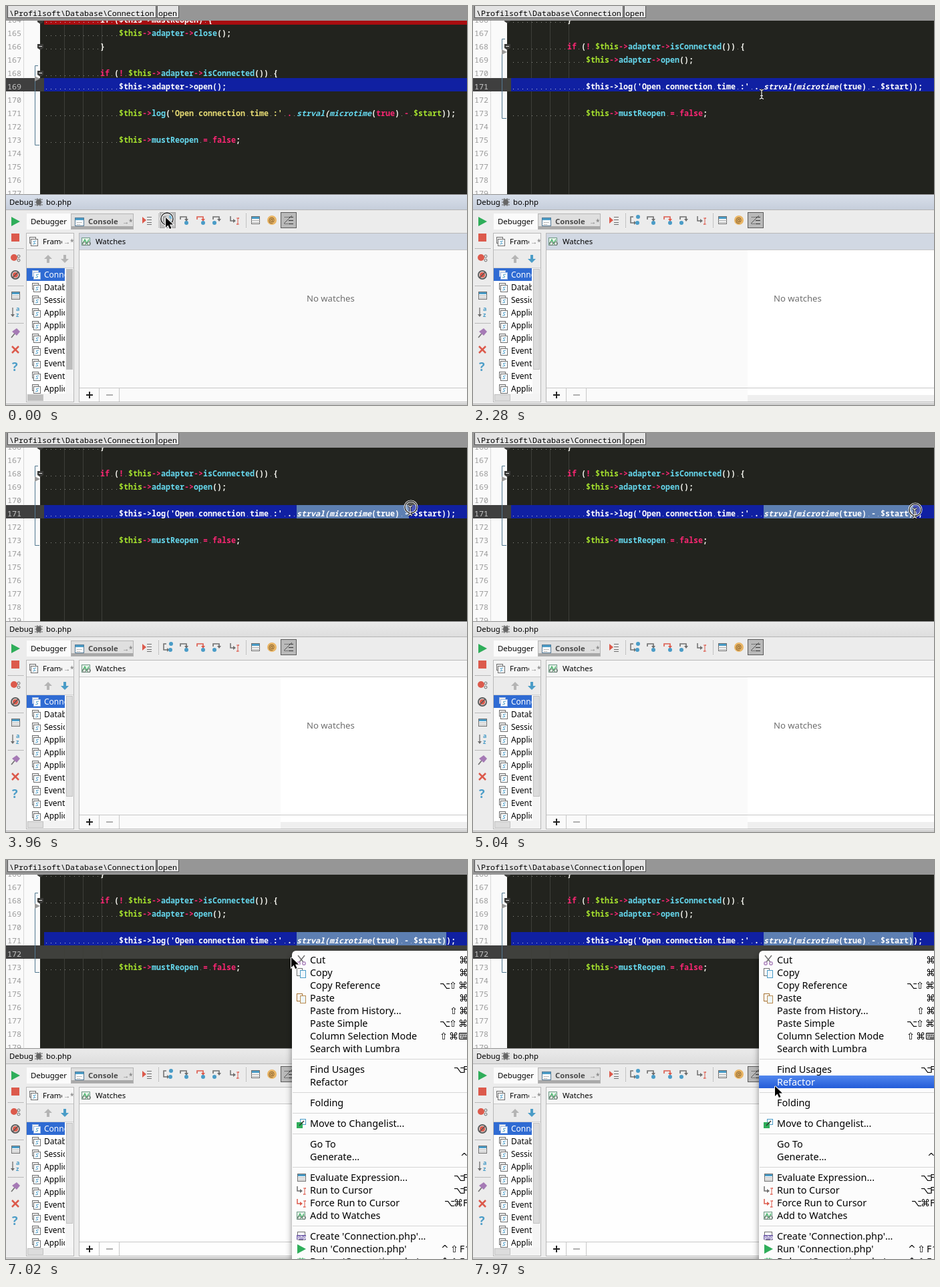
Recreate the animation shown at these times as an HTML page with a canvas. Size 690 by 598 pixels, loop 8 s.

```html
<!DOCTYPE html>
<html lang="en">
<head>
<meta charset="utf-8">
<title>Debugger session</title>
<style>
html, body { margin: 0; width: 100%; height: 100%; overflow: hidden; background: #ececec; }
canvas { display: block; }
</style>
</head>
<body>
<canvas id="stage" width="690" height="598"></canvas>
<script>
const ctx = document.getElementById('stage').getContext('2d');
const UI = '"Noto Sans", "Open Sans", sans-serif';
const MONO = '11.67px "Noto Sans Mono", "DejaVu Sans Mono", monospace';
const GREY = '#6e6e6e', BLUE = '#4a9cc7', RED = '#dc5a4c', GREEN = '#2fae5a';

// Drawing helpers
function rect(x, y, w, h, color) {
  ctx.fillStyle = color;
  ctx.fillRect(x, y, w, h);
}
function box(x, y, w, h, fill, edge) {
  rect(x, y, w, h, edge);
  rect(x + 1, y + 1, w - 2, h - 2, fill);
}
function text(s, x, y, font, color = '#000') {
  ctx.font = font;
  ctx.fillStyle = color;
  ctx.fillText(s, x, y);
}
const ui = (s, x, y, size = 11.4, color = '#000', weight = '') =>
  text(s, x, y, `${weight} ${size}px ${UI}`, color);
function path(points, color, width) {
  ctx.beginPath();
  for (let i = 0; i < points.length; i += 2) ctx.lineTo(points[i], points[i + 1]);
  if (width) {
    ctx.strokeStyle = color;
    ctx.lineWidth = width;
    ctx.stroke();
  } else {
    ctx.fillStyle = color;
    ctx.fill();
  }
}
function disc(x, y, r, color, width) {
  ctx.beginPath();
  ctx.arc(x, y, r, 0, 7);
  if (width) {
    ctx.strokeStyle = color;
    ctx.lineWidth = width;
    ctx.stroke();
  } else {
    ctx.fillStyle = color;
    ctx.fill();
  }
}
function fade(x, y, w, h, top, bottom) {
  const g = ctx.createLinearGradient(0, y, 0, y + h);
  g.addColorStop(0, top);
  g.addColorStop(1, bottom);
  rect(x, y, w, h, g);
}
function dots(x, y, count, dx, dy, color) {
  for (let i = 0; i < count; i++) rect(x + i * dx, y + i * dy, 1, 1, color);
}
function clipped(x, y, w, h, paint) {
  ctx.save();
  ctx.beginPath();
  ctx.rect(x, y, w, h);
  ctx.clip();
  paint();
  ctx.restore();
}
function at(x, y, paint) {
  ctx.save();
  ctx.translate(x, y);
  paint();
  ctx.restore();
}

// Eased position between [time, x, y] keys
function track(keys, t) {
  let a = keys[0];
  for (const b of keys) {
    if (t < b[0]) {
      const k = Math.max(0, (t - a[0]) / (b[0] - a[0] || 1)), e = k * k * (3 - 2 * k);
      return [a[1] + (b[1] - a[1]) * e, a[2] + (b[2] - a[2]) * e];
    }
    a = b;
  }
  return [a[1], a[2]];
}
const toEditor = [[1260, 239, 317], [1500, 350, 290], [1740, 500, 225], [2040, 433, 139]];
const beam = [
  [2100, 433, 139], [2280, 432, 132], [2520, 432, 128], [3060, 432, 128], [3240, 501, 113],
  [3540, 501, 113], [3660, 560, 104], [3900, 560, 104], [3960, 605, 116], [4380, 653, 119],
  [4860, 653, 119], [5040, 661, 120], [5460, 661, 120], [5820, 455, 130], [6060, 455, 130],
  [6360, 427, 139]];
const inMenu = [
  [7020, 427, 146], [7260, 450, 276], [7560, 450, 276], [7790, 451, 328], [7960, 451, 328],
  [7970, 452, 339]];

// Editor
const code = {
  164: [12, 'if ($this->mustReopen) {'],
  165: [16, '$this->adapter->close();'],
  166: [12, '}'],
  168: [12, 'if (! $this->adapter->isConnected()) {'],
  169: [16, '$this->adapter->open();'],
  171: [16, "$this->log('Open connection time :' . strval(microtime(true) - $start));"],
  173: [16, '$this->mustReopen = false;']
};
function tint(token) {
  if (token[0] === "'") return '#e6db74';
  if (token[0] === '$') return '#a6e22e';
  if (/^(->|[-=!.]|if|true|false)$/.test(token)) return '#f92672';
  return /^\w/.test(token) ? '#66d9ef' : '#f8f8f2';
}
function codeLine(row, y, plain) {
  if (!code[row]) return;
  const [indent, src] = code[row], line = ' '.repeat(indent) + src;
  for (const m of line.matchAll(/'[^']*'|\$\w+|->|\w+|\S/g)) {
    const slant = /^(strval|microtime)$/.test(m[0]) || (m[0] === '(' && line.startsWith('strval', m.index - 6));
    text(m[0], 57 + 7 * m.index, y + 17, (slant ? 'italic ' : '') + '600 ' + MONO, plain ? '#fff' : tint(m[0]));
  }
  [...line].forEach((c, i) => {
    if (c === ' ') rect(60 + 7 * i, y + 16, 1, 1, plain ? '#b9c0e0' : '#8a8b84');
  });
}
function foldMark(y) {
  path([47, y - 4, 56, y - 4, 56, y + 2, 51.5, y + 5, 47, y + 2], '#3a3a38');
  rect(49, y - 1, 5, 1, '#e8e8e8');
}
function editor(t) {
  const scroll = t < 660 ? 0 : 40, exec = t < 660 ? 169 : 171;
  const caret = t < 660 ? 169 : t < 3600 ? 171 : t < 3900 ? 170 : t < 6600 ? 171 : 172;
  const top = row => 108 + (row - 169) * 20 - scroll;
  rect(0, 22, 690, 260, '#22231e');
  rect(0, 22, 51, 260, '#fafafa');
  dots(26, 22, 130, 0, 2, '#b5b5b5');
  rect(51, top(caret), 639, 20, '#3f403c');
  for (const x of [87, 115, 143]) rect(x, 22, 1, 260, '#3d3e39');
  rect(0, top(caret), 51, 20, '#3f3f3f');
  rect(57, top(164), 633, 20, '#a80d10');
  rect(57, top(exec), 633, 20, '#1020a2');
  if (t >= 3060) {
    const end = 435 + 7 * Math.max(0, Math.floor((track(beam, Math.min(t, 5040))[0] - 435) / 7));
    if (caret === 170) {
      rect(57, top(170), 633, 20, '#5d7fb2');
      rect(57, top(171), 378, 20, '#5d7fb2');
    } else rect(435, top(171), end - 435, 20, '#5d7fb2');
  }
  for (let row = 164; row < 180; row++) {
    const y = top(row);
    text(row, 2, y + 17, MONO, row === caret ? '#c8c8c8' : '#9a9a9a');
    codeLine(row, y, row === exec || row === 164);
  }
  path([48, 89.5 - scroll, 43.5, 89.5 - scroll, 43.5, 208.5 - scroll, 50, 208.5 - scroll], '#52788f', 1);
  path([43, 105 - scroll, 51, 109 - scroll, 43, 113 - scroll], '#9a9a9a');
  for (const y of [22, 61, 101]) foldMark(y - scroll);
}
function breadcrumb() {
  rect(0, 0, 690, 22, '#969696');
  box(2, -1, 223, 19, '#e3e3e3', '#555');
  box(226, -1, 33, 19, '#e3e3e3', '#555');
  text('\\Profilsoft\\Database\\Connection', 5, 15, MONO);
  text('open', 228, 15, MONO);
}

// Icons, drawn around their own centre
function table(color = GREY) {
  box(-6, -6, 13, 12, '#f4f4f4', color);
  rect(-5, -5, 11, 3, BLUE);
  for (const y of [0, 3]) dots(-4, y, 5, 2, 0, color);
}
function step(color, flip) {
  path([-6, -1, -6, -5, 3, -5, 3, -1], color, 1.6);
  path([0, -2, 6, -2, 3, 2], color);
  disc(flip ? -4 : 3, 4, 3, BLUE);
}
function toCursor(color) {
  path([-6, -6, -6, 1, -1, 1], color, 1.5);
  path([-2, -2, 2, 1, -2, 4], color);
  path([3, -3, 7, -3, 5, -3, 5, 6, 3, 6, 7, 6], RED, 1);
}
function stack(edge = GREY) {
  box(-7, -7, 10, 10, '#eee', edge);
  box(-5, -4, 11, 11, '#fff', edge);
  path([3, -1, -1, 0, 2, 3, -2, 4], BLUE, 1);
}
function pages(back, front) {
  box(-7, -7, 9, 12, '#fff', back);
  box(-2, -4, 9, 12, '#eef6fb', front);
}
function glasses() {
  box(-7, -6, 13, 12, '#e7f3ea', '#6d9a85');
  path([-5, 3, -2, -3, 1, 3, 4, -3], GREEN, 1.2);
  disc(-3, 3, 2.5, GREY, 1);
  disc(4, 3, 2.5, GREY, 1);
}
function bug(color) {
  for (const y of [-4, 0, 4]) path([-6, y, 6, y], color, 1);
  for (const x of [-2, 2]) path([x, -6, x, 6], color, 1);
  disc(0, 0, 4, color);
}
const play = () => path([-6, -7, 7, 0, -6, 7], GREEN);
function arrowUp(color) {
  path([0, -6, 6, 0, 2, 0, 2, 6, -2, 6, -2, 0, -6, 0], color);
}

// Tool window
function leftBar() {
  at(14, 323, play);
  rect(8, 341, 12, 12, RED);
  disc(12, 377, 5, RED);
  disc(19, 375, 2, GREY, 1);
  disc(19, 381, 2, GREY, 1);
  disc(14, 403, 6, '#5c5c5c', 2);
  disc(14, 403, 4, RED);
  path([10, 407, 18, 399], '#555', 1.5);
  at(14, 434, () => table());
  path([10, 452, 10, 465], GREY, 1.3);
  path([7, 462, 13, 462, 10, 466], GREY);
  ui('a', 15, 457, 9, BLUE, 'bold');
  ui('z', 15, 466, 9, BLUE, 'bold');
  path([8, 497, 13, 491], GREY, 1.5);
  path([9, 488, 16, 494, 21, 488, 16, 483], '#a57ab5');
  path([9, 510, 19, 520], RED, 2.5);
  path([19, 510, 9, 520], RED, 2.5);
  ui('?', 9, 547, 18, BLUE, 'bold');
  for (const y of [363, 419, 475]) dots(3, y, 12, 2, 0, '#888');
}
function toolbar(t) {
  rect(31, 311, 66, 24, '#fbfbfb');
  box(97, 311, 94, 24, '#dfdfdf', '#b5b5b5');
  rect(98, 330, 92, 4, '#a9a9a9');
  ui('Debugger', 37, 327);
  at(110, 323, () => {
    box(-7, -6, 14, 13, '#fff', '#547a96');
    rect(-6, -5, 12, 3, BLUE);
    dots(-4, 1, 4, 2, 0, GREY);
    dots(-4, 4, 3, 2, 0, GREY);
  });
  ui('Console', 123, 327, 11.4, '#4a4a4a', 'bold');
  ui('→*', 174, 327, 10, GREY);
  if (t < 1320) box(230, 309, 24, 24, t < 60 ? '#bdbdbd' : '#d6d6d6', t < 60 ? '#a5a5a5' : '#c2c2c2');
  for (const x of [228, 359]) dots(x, 311, 11, 0, 2, '#999');
  at(211, 321, () => {
    path([-7, -5, -1, 0, -7, 5], RED);
    for (const y of [-5, -1, 3, 6]) rect(0, y, 7, 1, GREY);
  });
  at(242, 321, () => {
    path([-2, -5, -6, -5, -6, 4, 0, 4], GREY, 1.5);
    path([-1, 1, 2, 4, -1, 7], GREY);
    disc(5, -5, 3, BLUE);
    disc(4, 4, 3, BLUE);
  });
  at(267, 321, () => step(GREY));
  at(292, 321, () => step(RED));
  at(316, 321, () => step(GREY, true));
  at(342, 321, () => toCursor(GREY));
  at(373, 321, () => table());
  disc(398, 321, 7, '#e9b565');
  ui('@', 393, 325, 10, '#6a4a20');
  box(411, 309, 24, 24, '#b9b9b9', '#5a5a5a');
  at(423, 321, () => {
    for (const y of [-5, 0, 5]) rect(0, y, 7, 1, '#333');
    path([-7, 5, 5, -7], '#555', 1);
    dots(-6, -5, 3, 2, 0, '#333');
    dots(-6, 5, 3, 2, 0, '#333');
  });
}
function frames(t) {
  const names = ['Connection', 'Database', 'Session', 'Application', 'Application', 'Application',
    'EventManager', 'EventManager', 'EventManager', 'Application'];
  const listed = t < 660 || t >= 960;
  box(30, 340, 72, 254, '#fff', '#b9b9b9');
  rect(31, 341, 70, 24, '#f5f5f5');
  at(42, 353, () => stack());
  clipped(55, 342, 29, 22, () => ui('Frames', 55, 357));
  ui('→*', 86, 357, 10, GREY);
  rect(31, 365, 70, 28, '#ebebeb');
  rect(31, 365, 70, 1, '#c8c8c8');
  rect(31, 392, 70, 1, '#d0d0d0');
  at(63, 379, () => arrowUp('#b4b4b4'));
  at(88, 379, () => {
    ctx.rotate(Math.PI);
    arrowUp(t < 120 ? '#b4b4b4' : BLUE);
  });
  rect(31, 581, 70, 12, '#f3f3f3');
  const thumb = t < 660 ? '#bdbdbd' : '#dcdcdc';
  box(32, 582, 24, 10, thumb, '#c2c2c2');
  if (!listed) {
    clipped(31, 440, 70, 40, () => ui('Frames are not available', 34, 463, 13, GREY));
    return;
  }
  rect(89, 393, 12, 188, '#f5f5f5');
  box(90, 394, 10, 151, thumb, '#c2c2c2');
  rect(31, 393, 57, 19, '#2f6bd3');
  clipped(31, 393, 57, 188, () => names.forEach((name, i) => {
    at(46, 403 + 19 * i, () => stack(i ? GREY : '#9db9e6'));
    ui(name, 57, 407 + 19 * i, 12, i ? '#000' : '#fff');
  }));
}
function watches(t, focused) {
  const split = t >= 1260 && t < 6600;
  box(109, 340, 600, 254, split || t < 660 ? '#fafafa' : '#fefefe', '#b9b9b9');
  if (split) {
    rect(411, 366, 279, 227, '#fff');
    rect(411, 583, 279, 10, '#efefef');
  } else if (t >= 660 && t < 1260) rect(170, 583, 520, 10, '#f2f2f2');
  rect(110, 341, 580, 25, focused ? '#d1d8e3' : '#f5f5f5');
  rect(110, 365, 580, 1, '#c6c6c6');
  at(120, 353, glasses);
  ui('Watches', 134, 357);
  ui('No watches', 450, 443, 13.1, GREY);
  rect(110, 572, 580, 1, '#c8c8c8');
  rect(139, 573, 1, 20, '#c8c8c8');
  rect(169, 573, 1, 20, '#c8c8c8');
  rect(120, 582, 10, 2, '#222');
  rect(124, 578, 2, 10, '#222');
  rect(150, 582, 10, 2, '#b0b0b0');
}
function toolWindow(t) {
  const focused = t < 2820;
  rect(0, 282, 690, 316, '#ececec');
  fade(0, 282, 690, 23, focused ? '#d9e0eb' : '#ebebeb', focused ? '#c6cedb' : '#dedede');
  rect(0, 282, 690, 1, '#8f8f8f');
  rect(0, 305, 690, 1, '#b5b5b5');
  ui('Debug', 5, 298);
  at(49, 294, () => bug('#666'));
  ui('bo.php', 60, 298);
  leftBar();
  toolbar(t);
  frames(t);
  watches(t, focused);
  rect(0, 596, 690, 1, '#a8a8a8');
}

// Context menu: [label, keys, x of keys, icon]; null is a divider
const items = [
  ['Cut', '⌘', 678, () => {
    path([-5, -7, 3, 3], GREY, 1.5);
    path([5, -7, -3, 3], GREY, 1.5);
    disc(-4, 5, 2.2, '#b08ac0', 1.5);
    disc(4, 5, 2.2, '#b08ac0', 1.5);
  }],
  ['Copy', '⌘', 678, () => pages(GREY, BLUE)],
  ['Copy Reference', '⌥⇧⌘', 649],
  ['Paste', '⌘', 678, () => pages('#a5702f', '#b98a4e')],
  ['Paste from History...', '⇧⌘', 664],
  ['Paste Simple', '⌥⇧⌘', 649],
  ['Column Selection Mode', '⇧⌘⌨', 649],
  ['Search with Lumbra', '', 0],
  null,
  ['Find Usages', '⌥F', 670],
  ['Refactor', '', 0],
  null,
  ['Folding', '', 0],
  null,
  ['Move to Changelist...', '', 0, () => {
    box(-2, -7, 9, 9, '#fff', BLUE);
    rect(-7, -2, 9, 9, GREEN);
    path([-3, 3, 4, -4], '#333', 1.5);
  }],
  null,
  ['Go To', '', 0],
  ['Generate...', '^', 680],
  null,
  ['Evaluate Expression...', '⌥F', 670, () => table()],
  ['Run to Cursor', '⌥F', 670, () => toCursor(GREY)],
  ['Force Run to Cursor', '⌥⌘F', 656, () => toCursor(RED)],
  ['Add to Watches', '', 0, glasses],
  null,
  ["Create 'Connection.php'...", '', 0, () => {
    box(-6, -7, 12, 13, '#fff', GREY);
    rect(-7, -2, 14, 7, '#7a68b0');
    ui('php', -6, 4, 7, '#fff', 'bold');
  }],
  ["Run 'Connection.php'", '^⇧F1', 651, play],
  ["Debug 'Connection.php'", '^⇧F1', 651, () => bug(GREEN)]
];
function menu([mx, my]) {
  ctx.save();
  ctx.shadowColor = 'rgba(0,0,0,.45)';
  ctx.shadowBlur = 10;
  ctx.shadowOffsetY = 4;
  ctx.fillStyle = '#fcfcfc';
  ctx.beginPath();
  ctx.roundRect(428, 136, 300, 500, 6);
  ctx.fill();
  ctx.restore();
  let y = 140;
  for (const item of items) {
    if (!item) {
      rect(429, y + 6, 261, 1, '#d6d6d6');
      y += 12;
      continue;
    }
    const [label, keys, kx, icon] = item, mid = y + 10;
    const hot = mx > 428 && my >= y && my < y + 19, color = hot ? '#fff' : '#000';
    if (hot) fade(428, y, 262, 19, '#5187ee', '#235cd8');
    if (icon) at(442, mid, icon);
    ui(label, 455, mid + 5, 14.4, color);
    let x = kx;
    for (const k of keys) {
      text(k, x, mid + 5, `14px ${/\w/.test(k) ? UI : '"DejaVu Sans", sans-serif'}`, color);
      x += k === 'F' ? 8 : 14;
    }
    y += 19;
  }
}

// Pointers
function arrow([x, y]) {
  at(x, y, () => {
    const shape = [0, 0, 0, 15, 3.5, 11.5, 6, 17, 8.5, 16, 6, 10.5, 11, 10.5, 0, 0];
    path(shape, '#fff', 2);
    path(shape, '#000');
  });
}
function ibeam([x, y]) {
  at(x, y, () => {
    const shape = [-3, -7, 0, -5.5, 3, -7, 0, -5.5, 0, 6, -3, 7.5, 0, 6, 3, 7.5];
    path(shape, '#111', 3);
    path(shape, '#fff', 1.2);
    path([-2, 2.5, 2, 2.5], '#fff', 1);
  });
}
function ring(x, y) {
  disc(x, y, 9, 'rgba(255,255,255,.25)');
  disc(x, y, 9, '#fff', 3);
  disc(x, y, 9, '#111', 1.3);
}
function pointer(t) {
  if (t < 2100) {
    const p = track(toEditor, t);
    if (t < 60) ring(241, 319);
    (p[1] > 282 ? arrow : ibeam)(p);
  } else if (t < 6660) {
    const p = track(beam, t);
    if (t >= 2820 && t < 5220) ring(p[0] + 1, p[1] - 5);
    ibeam(p);
  } else arrow(track(inMenu, t));
}

function draw() {
  let t = performance.now() % 8000;
  if (t < 7790) t = Math.floor(t / 60) * 60;
  editor(t);
  breadcrumb();
  toolWindow(t);
  if (t >= 6660) menu(track(inMenu, t));
  pointer(t);
  requestAnimationFrame(draw);
}
draw();
</script>
</body>
</html>
```
